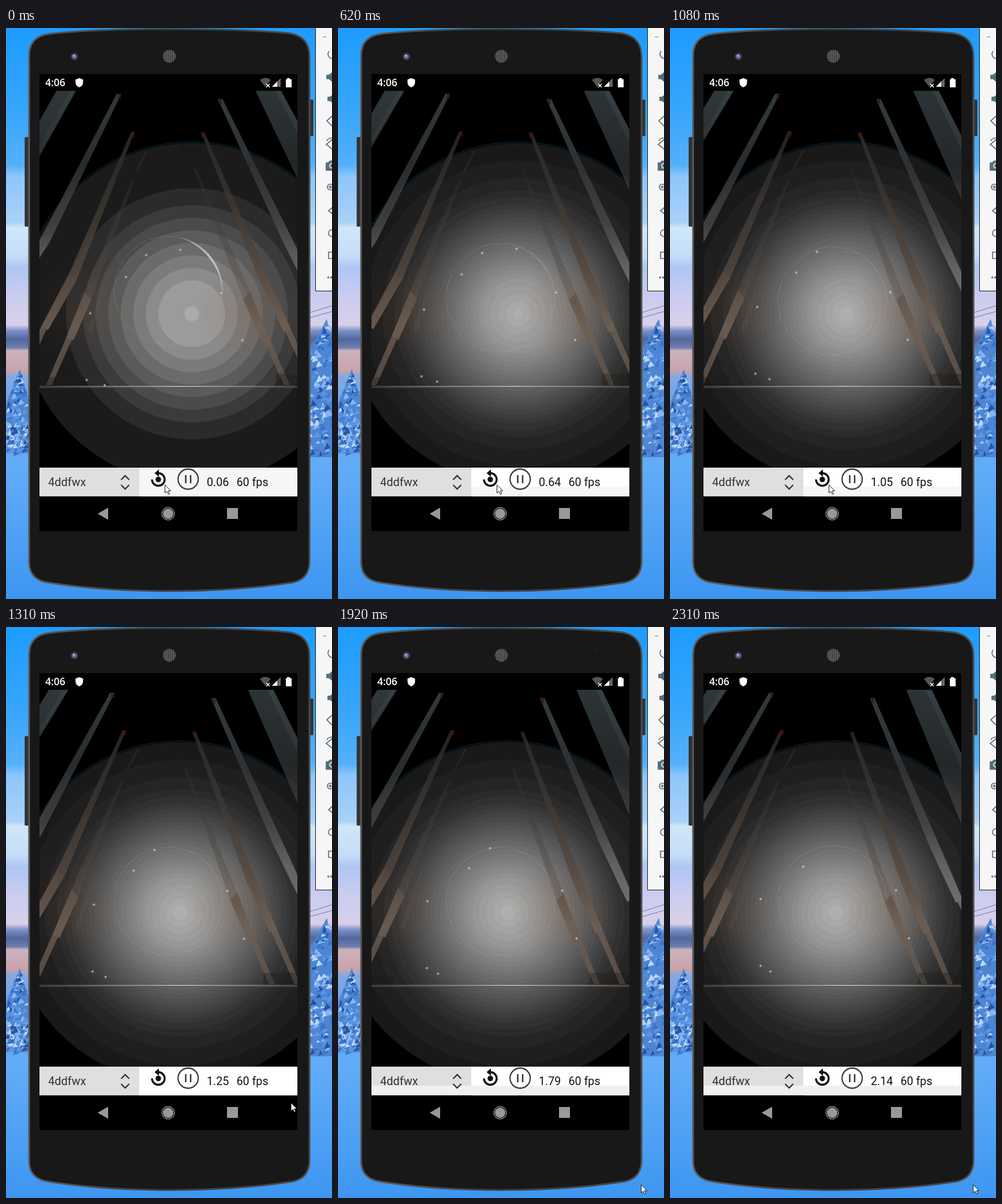
An HTML page with a canvas that plays this animation: 565x991 px, repeating every 2390 ms.

```html
<!DOCTYPE html>
<html lang="en">
<head>
<meta charset="utf-8">
<title>Phone shader preview</title>
<style>
html, body { margin: 0; width: 100%; height: 100%; overflow: hidden; background: #4a9cf2; }
svg, canvas { position: absolute; display: block; }
svg { left: 0; top: 0; }
canvas { left: 58px; top: 109px; }
text { font-family: Roboto, "Noto Sans", sans-serif; white-space: pre; }
</style>
</head>
<body>
<svg width="565" height="991" viewBox="0 0 565 991">
  <defs>
    <linearGradient id="sky" gradientUnits="userSpaceOnUse" x1="0" y1="0" x2="0" y2="991">
      <stop offset="0" stop-color="#1e9cff"/>
      <stop offset=".14" stop-color="#36a5fb"/>
      <stop offset=".24" stop-color="#55b0fa"/>
      <stop offset=".26" stop-color="#8dc6fb"/>
      <stop offset=".34" stop-color="#a9d1f8"/>
      <stop offset=".35" stop-color="#d0e7f9"/>
      <stop offset=".4" stop-color="#c4dcf8"/>
      <stop offset=".42" stop-color="#aec6f4"/>
      <stop offset=".47" stop-color="#cbcdf0"/>
      <stop offset=".52" stop-color="#d8d0e8"/>
      <stop offset=".53" stop-color="#7d92c8"/>
      <stop offset=".545" stop-color="#50679d"/>
      <stop offset=".56" stop-color="#6f7fae"/>
      <stop offset=".565" stop-color="#cdb3bf"/>
      <stop offset=".6" stop-color="#c9a3aa"/>
      <stop offset=".61" stop-color="#86a9e2"/>
      <stop offset=".7" stop-color="#5b9eec"/>
      <stop offset=".76" stop-color="#63adf8"/>
      <stop offset="1" stop-color="#3d96f1"/>
    </linearGradient>
    <linearGradient id="edge" x1="0" x2="1" y1="0" y2="0">
      <stop offset="0" stop-color="#5a5a5a"/>
      <stop offset=".5" stop-color="#3c3c3c"/>
      <stop offset="1" stop-color="#4c4c4c"/>
    </linearGradient>
    <pattern id="mesh" width="3.6" height="3.6" patternUnits="userSpaceOnUse">
      <circle cx="1.8" cy="1.8" r="1.25" fill="#858585"/>
    </pattern>
  </defs>
  <path d="M0 0H565V991H0z" fill="url(#sky)"/>
  <g id="trees"></g>
  <path d="M526 494L565 482M526 503L565 492" stroke="#5f76ad" fill="none"/>

  <path d="M39 190H33V344H39zM526 125H532V187H526z" fill="#343434" stroke="#202020"/>
  <path d="M40 48Q40 14 76 10Q150 2 283 2T490 9Q526 14 526 50V925Q526 959 492 963Q400 977 283 977T76 963Q40 959 40 927z" fill="#181818" stroke="url(#edge)" stroke-width="3"/>
  <circle cx="118.5" cy="49.5" r="6.5" fill="#3a3d49"/>
  <circle cx="118.5" cy="49.5" r="3.8" fill="#6674ab"/>
  <circle cx="117.5" cy="48" r="1.5" fill="#c0c9ef"/>
  <circle cx="283" cy="49" r="11.5" fill="#2b2b2b"/>
  <circle cx="283" cy="49" r="11" fill="url(#mesh)"/>
  <path d="M438 49h4M451 49h4" stroke="#101010" stroke-width="3"/>

  <path d="M58 80H505V873H58z"/>
  <text x="68" y="101" font-size="17.5" font-weight="600" fill="#fff" style="font-family:'Open Sans',sans-serif">4:06</text>
  <path d="M127 87l6.5 2.500v5q0 6-6.500 8.500q-6.500-2.500-6.500-8.500v-5z" fill="#fff"/>
  <path d="M440 90Q449.500 83 459 90L449.500 102z" fill="#555"/>
  <path d="M451 97l6 6m0-6l-6 6" stroke="#fff" stroke-width="1.6"/>
  <path d="M476 87V102H461z" fill="#666"/>
  <path d="M470 93V102H461z" fill="#fff"/>
  <path d="M487 87h5v2h3v14h-10V89h2z" fill="#fff"/>

  <path id="barL" d="M58 763H231V813H58z"/>
  <path id="barR" d="M231 763H505V813H231z"/>
  <path id="footL" d="M58 796H231V813H58z"/>
  <path id="footR" d="M231 796H505V813H231z"/>
  <path d="M58 812.5H231" stroke="#bcbcbc"/>
  <text x="73" y="795" font-size="20" fill="#333">4ddfwx</text>
  <path d="M199.500 784l7-7l7 7m-14 9l7 7l7-7" fill="none" stroke="#333" stroke-width="2.3"/>
  <path d="M264 772.5A11 11 0 1 1 253 783.5" fill="none" stroke="#111" stroke-width="3.4"/>
  <path d="M257.500 772.500L265 766V779z" fill="#111"/>
  <circle cx="264" cy="783.5" r="4.8" fill="#111"/>
  <circle cx="315.7" cy="783" r="17.5" fill="none" stroke="#3c3c3c" stroke-width="2.3"/>
  <path d="M311.500 776v14m8.500-14v14" stroke="#333" stroke-width="2.5"/>
  <text id="clock" x="348" y="795" font-size="19.7" fill="#111">0.06</text>
  <text x="399.5" y="795" font-size="19.7" fill="#111">60 fps</text>

  <g fill="#999">
    <path d="M159 843l18-10.500v21zM383 833h19v19h-19z"/>
    <circle cx="281" cy="843" r="9"/>
    <circle cx="281" cy="843" r="10.8" fill="none" stroke="#999" stroke-width="1.3"/>
  </g>

  <path d="M536.500 -1H570V456.500H536.500z" fill="#f6f6f6" stroke="#111"/>
  <g fill="none" stroke="#546e7a" stroke-width="1.7">
    <path d="M549 15.500h6" stroke="#888" stroke-width="1.2"/>
    <path d="M560 40A8 8 0 0 0 565 53"/>
    <path d="M556 82h4l6-5v16l-6-5h-4zM558 120h4l5-4v14l-5-4h-4z" fill="#546e7a"/>
    <path d="M566 152l-10 9l10 10"/>
    <path d="M566 193l-11 9l11 9M556 196q2-5 9-5"/>
    <path d="M555 234h4l2-3h8v16h-14z" fill="#546e7a"/>
    <circle cx="565" cy="239" r="4" stroke="#f6f6f6"/>
    <circle cx="562" cy="276" r="5"/>
    <path d="M559 276h6m-3-3v6"/>
    <path d="M566 311l-7 6l7 6m0 66h-7v11h7"/>
    <circle cx="565" cy="356" r="6"/>
    <path d="M557 433h3m2 0h3" stroke-width="3"/>
  </g>
  <path id="cursor" d="M0 0v14l3.400-3l2.400 5.300l2.200-1l-2.300-5.100h4.300z" fill="#fff" stroke="#111"/>
</svg>
<canvas id="scene" width="447" height="654"></canvas>

<script>
const $ = id => document.getElementById(id);
const g = $('scene').getContext('2d');
const LOOP = 2390;

// Steps last 80 ms, some of them 70 ms
const isShort = k => [2, 5, 9, 12, 16, 19, 21, 24, 27].includes(k);
const starts = [0];
for (let k = 0; k < 31; k++) starts.push(starts[k] + (isShort(k) ? 70 : 80));

// [key, value, ...] rows, linear in between
function along(rows, x, col = 1) {
  let i = 1;
  while (i < rows.length - 1 && x > rows[i][0]) i++;
  const a = rows[i - 1], b = rows[i];
  const f = Math.max(0, Math.min(1, (x - a[0]) / (b[0] - a[0])));
  return a[col] + (b[col] - a[col]) * f;
}
const clock = [[0, .06], [390, .43], [850, .85], [1310, 1.25], [1620, 1.52], [1920, 1.79], [2310, 2.14]];
const mouse = [[1080, 275.5, 793], [1310, 494, 826], [1470, 514, 925], [1620, 522.5, 964], [1690, 525.5, 968]];

// x, y, speed x, speed y, end
const sparks = [
  [302, 385, 13, -3, .7], [243, 394, 12, -5.8, 2], [208, 432, 11, -7.7, 9],
  [146, 495, 5.3, -11, 9], [373, 460, 9, -1.4, 9], [410, 542, 2, -.8, 9],
  [140, 611, 8.2, -11, 9], [171, 620, 1.4, -10.6, 9]
];

// top x, top y, top width, joint x, joint y, block run, block drop, strength
const pillars = [
  [192, 114, 8, 64, 358, 44, 76, .85],
  [217, 180, 6, 110, 425, 50, 95, .8],
  [218, 265, 4, 136, 458, 32, 80, .4],
  [375, 123, 8, 492, 358, 50, 106, .9],
  [344, 181, 6, 450, 423, 44, 100, .85],
  [330, 245, 4, 423, 458, 35, 84, .4]
];

function ramp(stops, x1, y1, x0 = 0, y0 = 0) {
  const r = g.createLinearGradient(x0, y0, x1, y1);
  stops.forEach(([o, c]) => r.addColorStop(o, c));
  return r;
}
const warm = ramp([[0, '#2a2726'], [.3, '#35312e'], [.6, '#54483f'], [.8, '#6f5f53'], [1, '#62574f']], 0, 622, 0, 109);
const cool = ramp([[0, '#3b4549'], [.25, '#303436'], [.45, '#454544'], [.6, '#66696b'], [.75, '#777a7c']], 0, 622, 0, 109);
const floor = ramp([[0, '#3d3b3a'], [.3, '#827d79'], [.55, '#b5aca5'], [.8, '#827d79'], [1, '#464443']], 505, 0, 58);

function disc(x, y, r, color) {
  g.fillStyle = color;
  g.beginPath();
  g.arc(x, y, r, 0, 7);
  g.fill();
}

function glow(x, y, r, rgb, a) {
  const s = g.createRadialGradient(x, y, 0, x, y, r);
  s.addColorStop(0, `rgba(${rgb},${a})`);
  s.addColorStop(1, `rgba(${rgb},0)`);
  disc(x, y, r, s);
}

function drawLight(x, T, coarse) {
  const step = coarse ? 16 : 6;
  const peak = 172 + 8 * Math.min(1, T);
  const radius = [[24, 296], [39, 220], [54, 191], [152, 58], [peak, 0]];
  g.lineWidth = 3;
  g.strokeStyle = '#04141f';
  g.beginPath();
  g.arc(x, 496, 298, 3.5, 5.9);
  g.stroke();
  for (let v = 24; v < peak; v += step) {
    const c = v + (coarse ? 3 : 1);
    disc(x, 496, along(radius, v), `rgb(${c},${c},${c})`);
  }
}

// Camera drift: lower points slide further, the middle tilts a little
function drift([x, y], p, rate) {
  const bump = Math.max(0, Math.sin(Math.PI * (y - 110) / 510));
  return [x - (18 + .045 * y) * p * rate, y + .05 * (x - 280) * p * bump];
}

function slab(pts, p, alpha, fill, rate = 1) {
  g.globalAlpha = alpha;
  g.fillStyle = fill;
  g.beginPath();
  pts.forEach(q => g.lineTo(...drift(q, p, rate)));
  g.fill();
}

function drawPillar([tx, ty, w, jx, jy, run, drop, alpha], p) {
  const s = jx < 280 ? -1 : 1;
  const outer = Math.abs(jx - 280) > 200;
  const fill = outer ? cool : warm, rate = outer ? .87 : 1;
  const bx = jx + s * run, by = jy + drop;
  const fx = bx + (620 - by) * (jx - tx) / (jy - ty);
  const inner = [jx - s * 12, jy + 13];
  slab([[tx, ty], [tx - s * w, ty], inner, [jx, jy]], p, alpha, fill, rate);
  slab([[jx, jy], inner, [bx - s * 13, by + 4], [bx, by]], p, .9, fill, rate);
  slab([[bx, by], [bx - s * 10, by + 3], [fx - s * 10, 620], [fx, 620]], p, .78, fill, rate);
  if (ty < 190) {
    const [x, y] = drift([tx - s * w / 2, ty], p, rate);
    g.fillStyle = '#40170c';
    g.fillRect(x - 2, y, 5, 9);
  }
}

function drawHall(p) {
  const panel = (a, b, c, d, alpha) => slab([[a, 108], [b, 108], c, d], p, alpha, cool);
  panel(88, 122, [56, 226], [56, 165], .8);
  panel(112, 120, [56, 222], [56, 208], .6);
  panel(432, 476, [545, 235], [545, 345], .75);
  panel(466, 476, [545, 235], [545, 258], .7);
  slab([[190, 380], [194, 380], [150, 528], [142, 525]], p, .18, warm);
  slab([[243, 212], [246, 214], [228, 250], [225, 248]], p, .5, warm);
  pillars.forEach(row => drawPillar(row, p));
  g.globalAlpha = 1;
}

function drawRing(T) {
  const x = 281.5, y = 454 + 23 * Math.sin(T), r = 94;
  g.lineWidth = 1;
  g.strokeStyle = 'rgba(190,185,180,.22)';
  g.setLineDash([31, 3, 12, 5]);
  g.beginPath();
  g.arc(x, y, r, 0, 7);
  g.stroke();
  g.setLineDash([]);
  const shine = Math.max(.08, .85 * Math.exp(-2.3 * (T - .06)));
  const from = -1.35, span = 1.4, n = 28;
  for (let i = 0; i < n; i++) {
    const s = Math.sin(Math.PI * (i + .5) / n), a = from + span * i / n;
    g.strokeStyle = `rgba(210,212,214,${shine * (.25 + .7 * s)})`;
    g.lineWidth = .8 + 3 * s * Math.min(1, shine + .1);
    g.beginPath();
    g.arc(x, y, r - g.lineWidth / 2, a, a + span / n);
    g.stroke();
  }
}

function drawScene(T, coarse) {
  const dt = T - .06, p = dt / 2.08;
  g.setTransform(1, 0, 0, 1, -58, -109);
  g.fillStyle = '#000';
  g.fillRect(58, 109, 447, 654);
  const lx = 322 - 34 * p;
  drawLight(lx, T, coarse);
  g.fillStyle = '#171717';
  for (let i = 0; i < 9; i++) g.fillRect(lx - 20 + i * 4, 203 + i * 5 % 7, 3, 10);
  glow(415 - 38 * p, 490, 85, '130,90,60', .22);
  glow(140 - 38 * p, 490, 85, '120,85,60', .17);
  drawHall(p);
  g.fillStyle = 'rgba(30,27,25,.35)';
  g.fillRect(58, 606, 54 - 20 * p, 15);
  g.fillRect(468 - 38 * p, 600, 80, 21);
  g.fillStyle = floor;
  g.fillRect(58, 621, 447, 2);
  g.fillStyle = 'rgba(90,86,83,.5)';
  g.fillRect(58, 623, 447, 2);
  drawRing(T);
  for (const [x, y, vx, vy, end] of sparks) {
    if (T > end) continue;
    const sx = x + vx * dt, sy = y + vy * dt;
    glow(sx, sy, 3.5, '225,225,225', .47);
    disc(sx, sy, 1.1, 'rgba(235,235,235,.78)');
  }
}

function drawBar(k, coarse) {
  const grey = ['#f0f0f0', '#f0f0f0'], first = ['#dfdfdf', '#f6f6f6'];
  const top = !coarse ? ['#dfdfdf', '#fff'] : k ? grey : first;
  const foot = k > 20 ? grey : k > 14 ? top : first;
  const paint = (id, c) => $(id).setAttribute('fill', c);
  paint('barL', top[0]);
  paint('barR', top[1]);
  paint('footL', foot[0]);
  paint('footR', foot[1]);
}

// Snowy trees beside the phone
let seed = 7;
const rnd = () => (seed = seed * 16807 % 2147483647) / 2147483647;
function trees(x0, x1, peak, base, tipX) {
  const mid = x0 + tipX;
  let out = `<path fill="#4e86d3" d="M${x0} ${peak + 60}L${mid} ${peak}L${x1} ${peak + 55}V${base}H${x0}z"/>`;
  const colors = ['#2754a4', '#3b75c8', '#86b5f1', '#bad7fa', '#5c97e4'];
  for (let i = 0; i < 130; i++) {
    const y = peak + 8 + rnd() * (base - peak - 15);
    const reach = Math.min(1, (y - peak) / 60);
    const x = mid + (x0 + rnd() * (x1 - x0) - mid) * reach;
    const w = 2 + rnd() * 6, h = 3 + rnd() * 8;
    out += `<path fill="${colors[i % 5]}" d="M${x} ${y}l${w} ${h}l${-w * 1.8} ${h * .4}z"/>`;
  }
  return out;
}
$('trees').innerHTML = trees(0, 40, 592, 738, 24) + trees(524, 568, 505, 745, 32);

let shown = -1;
const t0 = performance.now();
function tick() {
  const t = Math.max(0, performance.now() - t0) % LOOP;
  let k = 0;
  while (starts[k + 1] <= t) k++;
  if (k !== shown) {
    shown = k;
    const ms = starts[k], T = along(clock, ms);
    const coarse = k === 0 || k === 21 || k === 22;
    drawScene(T, coarse);
    drawBar(k, coarse);
    $('clock').textContent = T.toFixed(2);
    $('cursor').setAttribute('transform', `translate(${along(mouse, ms)} ${along(mouse, ms, 2)})`);
  }
  requestAnimationFrame(tick);
}
tick();
</script>
</body>
</html>
```
